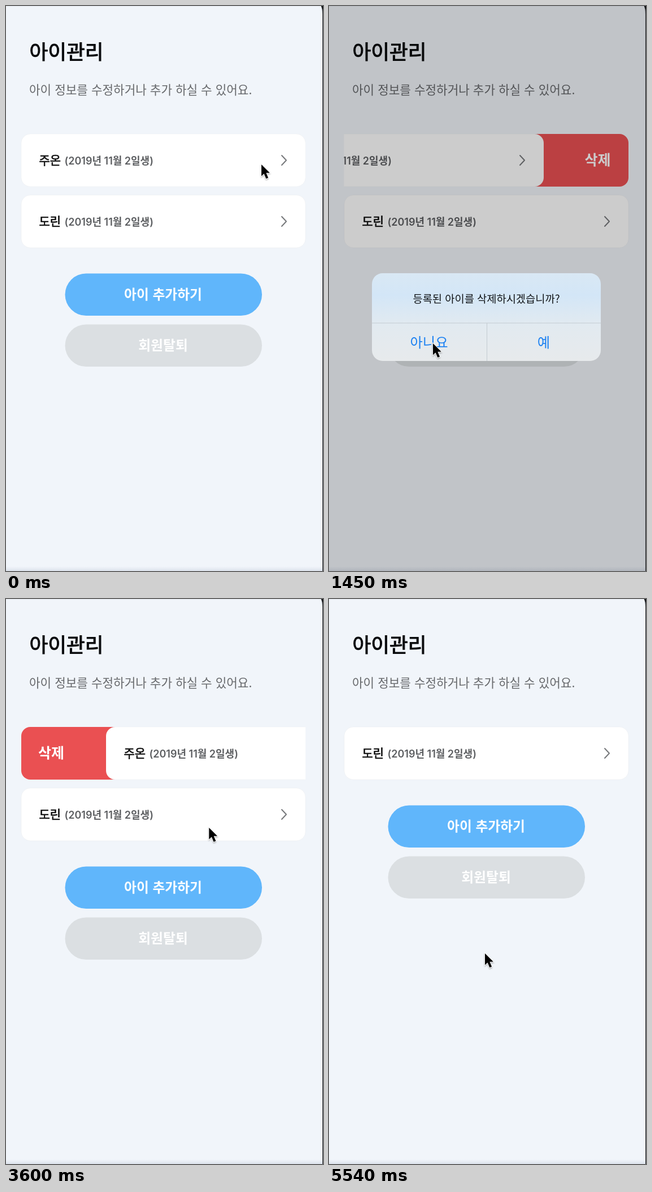
An HTML page that plays this animation: 561x998 px, repeating every 5630 ms.

```html
<!DOCTYPE html>
<html lang="ko">
<head>
<meta charset="utf-8">
<title>아이관리</title>
<style>
  html, body { margin: 0; width: 100%; height: 100%; overflow: hidden; background: #f1f5fa; }
  svg { display: block; width: 100vw; height: 100vh; }
  text { font-family: "Noto Sans CJK KR", "Noto Sans CJK", sans-serif; }
  /* A thin outline gives the regular cut a medium weight. */
  .title { font-size: 35.6px; fill: #0b0c0e; stroke: #0b0c0e; stroke-width: 1.1; }
  .lead { font-size: 21.3px; fill: #66686b; }
  .name { font-size: 21px; fill: #111; stroke: #111; stroke-width: .7; }
  .birth { font: 600 18px Inter, "Noto Sans CJK KR", "Noto Sans CJK", sans-serif; fill: #5c5e61; }
  .mid { text-anchor: middle; }
  .button { font-size: 23.8px; font-weight: 700; fill: #fff; }
  .delete { font-size: 25px; font-weight: 700; fill: #fff; }
  .ask { font-size: 18.7px; fill: #111417; }
  .answer { font-size: 24.3px; fill: #1a80f2; }
  .card { fill: #fff; stroke: #000; stroke-opacity: .035; }
  .chevron { fill: none; stroke: #77797c; stroke-width: 2; stroke-linecap: round; stroke-linejoin: round; }
</style>
</head>
<body>
<svg viewBox="0 0 561 998" preserveAspectRatio="none">
  <defs>
    <clipPath id="slot"><rect x="26.5" y="225.5" width="503.5" height="94"/></clipPath>
    <linearGradient id="glass" x2="0" y2="1">
      <stop offset="0" stop-color="#d9e8f4"/>
      <stop offset=".25" stop-color="#d3e6f7"/>
      <stop offset=".6" stop-color="#e2eaf0"/>
      <stop offset="1" stop-color="#e7eaec"/>
    </linearGradient>
    <linearGradient id="foot" x2="0" y2="1">
      <stop offset="0" stop-color="#f1f5fa"/>
      <stop offset="1" stop-color="#dce2ec"/>
    </linearGradient>
    <filter id="shade" x="-50%" y="-50%" width="200%" height="200%">
      <feDropShadow dx="0" dy="1.5" stdDeviation="1.3" flood-opacity=".35"/>
    </filter>
  </defs>

  <rect width="561" height="998" fill="#f1f5fa"/>
  <rect width="561" height="1" fill="#e6eaf0"/>
  <rect y="990" width="561" height="8" fill="url(#foot)"/>
  <text class="title" x="41.5" y="93.5">아이관리</text>
  <text class="lead" x="41" y="156">아이 정보를 수정하거나 추가 하실 수 있어요.</text>

  <g id="first" clip-path="url(#slot)">
    <g id="red">
      <rect x="27" y="226" width="503" height="93" rx="16" fill="#ea5052"/>
      <text class="delete mid" x="80" y="281">삭제</text>
      <text class="delete mid" x="475.5" y="281">삭제</text>
    </g>
    <g id="slider">
      <rect class="card" x="27" y="226" width="503" height="93" rx="16"/>
      <text class="name" x="58.5" y="280">주온</text>
      <text class="birth" x="103.5" y="280">(2019년 11월 2일생)</text>
      <path class="chevron" d="M488 264l8 8.5-8 8.5"/>
    </g>
  </g>

  <g id="rest">
    <g transform="translate(0 108)">
      <rect class="card" x="27" y="226" width="503" height="93" rx="16"/>
      <text class="name" x="58.5" y="280">도린</text>
      <text class="birth" x="103.5" y="280">(2019년 11월 2일생)</text>
      <path class="chevron" d="M488 264l8 8.5-8 8.5"/>
    </g>
    <rect x="104.5" y="472.5" width="348.5" height="74.5" rx="37.25" fill="#60b6fb"/>
    <text class="button mid" x="278" y="517.7">아이 추가하기</text>
    <rect x="104.5" y="562.5" width="348.5" height="74.5" rx="37.25" fill="#dbdfe2"/>
    <text class="button mid" x="278" y="608">회원탈퇴</text>
  </g>

  <path d="M557.5 0Q560 4 560 14V998H561V0Z" fill="#15171a"/>

  <rect id="dim" width="561" height="998"/>
  <g id="alert">
    <rect x="76" y="472" width="405" height="155" rx="19" fill="url(#glass)"/>
    <path d="M76 560H481M279.5 560V627" stroke="#c3cbd1" fill="none"/>
    <text class="ask mid" x="278.5" y="523.5">등록된 아이를 삭제하시겠습니까?</text>
    <text class="answer mid" x="177" y="602.5">아니요</text>
    <text class="answer mid" x="380" y="602.5">예</text>
  </g>

  <path id="cursor" d="M0 0V20.5l4.6-4.3 3.7 8.9 3.8-1.6-3.7-8.7h6.4Z" fill="#000"
        stroke="#fff" stroke-width="1.6" paint-order="stroke" filter="url(#shade)"/>
</svg>
<script>
  const LOOP = 5630, STEP = 50, MOVE = 300, FADE = 100;
  const REMOVED_AT = 4150, ROW = 108, OPEN = 150, HALF_OPEN = 94;

  const spot = (x, y) => ({ x, y });
  const grab = spot(452, 280);

  // The pointer reaches each spot at the given time, after a move of at most MOVE ms.
  const visits = [
    { at: 350, to: spot(grab.x - OPEN, 284) },
    { at: 650, to: spot(475, 275) },
    { at: 1270, to: spot(184, 596) },
    { at: 1800, to: spot(99, 255) },
    { at: 2200, to: spot(461 - HALF_OPEN, 284) },
    { at: 2800, to: spot(461, 283) },
    { at: 3500, to: spot(511, 474) },
    { at: 3750, to: spot(80, 275) },
    { at: 4000, to: spot(380, 592) },
    { at: REMOVED_AT, to: spot(276, 626) }
  ];

  const part = id => document.getElementById(id);
  const [first, red, slider, rest, dim, alertBox, cursor] =
    ["first", "red", "slider", "rest", "dim", "alert", "cursor"].map(part);
  const place = (el, value) => el.setAttribute("transform", value);
  const show = (el, opacity) => el.setAttribute("opacity", opacity);

  // Eased rise from 0 to 1 between two times.
  function ramp(t, from, to) {
    const k = Math.min(1, Math.max(0, (t - from) / (to - from)));
    return k * k * (3 - 2 * k);
  }
  const rise = (t, from) => ramp(t, from, from + FADE);
  const pulse = (t, open, close) => rise(t, open) - rise(t, close);

  function pointerAt(t) {
    let { x, y } = grab, left = 0;
    for (const { at, to } of visits) {
      const k = ramp(t, Math.max(left, at - MOVE), at);
      x += (to.x - x) * k;
      y += (to.y - y) * k;
      left = at;
    }
    return spot(x, y);
  }

  // Swipe left, spring back, drag half way right, then snap open.
  const swipeAt = t =>
    OPEN * (ramp(t, 1500, 1700) - ramp(t, 50, 350)) +
    HALF_OPEN * ramp(t, 2500, 2800) +
    (OPEN - HALF_OPEN) * ramp(t, 2900, 3100);

  function draw(now) {
    const t = Math.floor((now % LOOP) / STEP) * STEP;
    const { x, y } = pointerAt(t);
    const offset = swipeAt(t);
    const opacity = pulse(t, 800, 1450) + pulse(t, 3750, 4000);
    const zoom = 1.15 - 0.15 * (t < 2000 ? rise(t, 800) : rise(t, 3750));
    const removed = t >= REMOVED_AT;

    place(cursor, `translate(${x} ${y})`);
    place(slider, `translate(${offset} 0)`);
    show(red, Math.abs(offset) > 0.5 ? 1 : 0);
    show(first, removed ? 0 : 1);
    place(rest, `translate(0 ${removed ? -ROW : 0})`);
    show(dim, opacity * 0.2);
    show(alertBox, opacity);
    place(alertBox, `translate(278.5 549.5) scale(${zoom}) translate(-278.5 -549.5)`);
  }

  const start = performance.now();
  function tick() {
    draw(performance.now() - start);
    requestAnimationFrame(tick);
  }
  tick();
</script>
</body>
</html>
```
